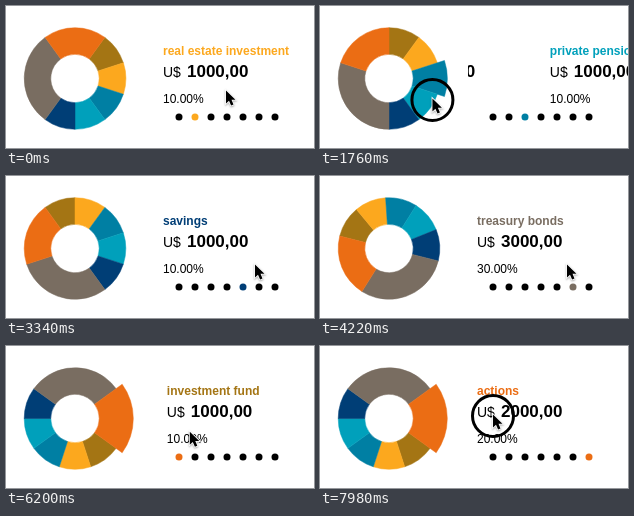
These frames come from a looping animation (308x142 px, 8000 ms). An HTML page with a canvas:

```html
<!DOCTYPE html>
<html lang="en">
<head>
<meta charset="utf-8">
<title>Portfolio donut</title>
<style>
  html, body { margin: 0; width: 100%; height: 100%; overflow: hidden; background: #fff; }
  canvas { display: block; }
</style>
</head>
<body>
<canvas id="stage" width="308" height="142"></canvas>
<script>
const ctx = document.getElementById('stage').getContext('2d');
const LOOP = 8000, TAU = Math.PI * 2;
const CX = 69, CY = 72.5, INNER = 24.2, OUTER = 50.8, POP = 7.5;
const PAGE_WIDTH = 160, DRAG_WIDTH = 90, POINTER_REACH = 110;
const DRAG_MS = 180, SETTLE_MS = 260, TURN_DELAY = 520, RING_LEAD = 60;

// One entry per page and slice, clockwise: title, share in tenths, colour.
const items = [
  ['investment fund', 1, [164, 117, 20]],
  ['real estate investment', 1, [252, 168, 30]],
  ['fixed income', 1, [0, 127, 163]],
  ['private pension', 1, [0, 160, 187]],
  ['savings', 1, [0, 62, 118]],
  ['treasury bonds', 3, [121, 109, 97]],
  ['actions', 2, [235, 109, 20]],
].map(([title, share, color]) => ({ title, share, color }));

let edge = -0.15 * TAU;
for (const item of items) {
  item.start = edge;
  edge += item.share / 10 * TAU;
  item.end = edge;
}

// Press time and place of each swipe, and how long the pointer lingers after it.
// Swipes step one page forward, except the one that goes back.
const BACK = 7;
const swipes = [
  [-710, 219, 83], [460, 219, 83, 340], [1600, 218, 91], [2780, 255, 87],
  [3640, 248, 87], [4790, 246, 87], [5860, 238, 88], [7020, 186, 84], [8000, 172, 67],
].map(([press, x, y, linger = 0], i) => ({
  press, x, y, linger,
  release: press + DRAG_MS,
  turn: press + TURN_DELAY,
  from: i,
  to: i === BACK ? i - 1 : i + 1,
}));

const clamp = v => Math.min(1, Math.max(0, v));
const ramp = (t, start, length) => clamp((t - start) / length);
const smooth = u => u * u * (3 - 2 * u);
const easeOut = u => 1 - (1 - u) ** 3;
const mix = (a, b, u) => a + (b - a) * u;
const rgb = c => `rgb(${c.map(Math.round).join()})`;
const itemAt = page => items[page % items.length];

function angleOf(page) {
  const { start, end } = itemAt(page);
  return (start + end) / 2 + TAU * Math.floor(page / items.length);
}

function drawDonut(t, { turn, from, to }) {
  const turned = smooth(ramp(t, turn + 40, 150));
  const rotation = -mix(angleOf(from), angleOf(to), turned);
  const popFrom = 1 - ramp(t, turn, 40);
  const popTo = ramp(t, turn + 190, 70);
  ctx.lineWidth = 0.5;
  for (const item of items) {
    const pop = item === itemAt(from) ? popFrom : item === itemAt(to) ? popTo : 0;
    const a = item.start + rotation, b = item.end + rotation;
    ctx.beginPath();
    ctx.arc(CX, CY, OUTER + POP * pop, a, b);
    ctx.arc(CX, CY, INNER, b, a, true);
    ctx.closePath();
    ctx.fillStyle = ctx.strokeStyle = rgb(item.color);
    ctx.fill();
    ctx.stroke();
  }
}

function text(str, x, y, font, color = '#000') {
  ctx.font = font + ' "Liberation Sans", Arial, sans-serif';
  ctx.fillStyle = color;
  ctx.fillText(str, x, y);
}

function drawPage({ title, share, color }, x) {
  text(title, x, 49, 'bold 12px', rgb(color));
  text('U$', x, 71, '14px');
  text(share + '000,00', x + 24, 71, 'bold 17px');
  text(share + '0.00%', x, 97, '12px');
}

function drawPages(t, { press, release, from, to }) {
  const dragged = DRAG_WIDTH * smooth(ramp(t, press, DRAG_MS));
  const settled = easeOut(ramp(t, release, SETTLE_MS));
  const shift = dragged + (PAGE_WIDTH - DRAG_WIDTH) * settled;
  const dir = to - from;
  ctx.save();
  ctx.beginPath();
  ctx.rect(148, 30, PAGE_WIDTH, 74);
  ctx.clip();
  drawPage(itemAt(from), 157 - dir * shift);
  drawPage(itemAt(to), 157 + dir * (PAGE_WIDTH - shift));
  ctx.restore();
}

// The marked dot moves first; its colour follows.
function drawDots(t, { release, from, to }) {
  const active = itemAt(t < release + 145 ? from : to);
  const fade = ramp(t, release + 165, 150);
  const color = itemAt(from).color.map((c, i) => mix(c, itemAt(to).color[i], fade));
  items.forEach((item, i) => {
    ctx.beginPath();
    ctx.arc(173 + 16 * i, 111, 3.5, 0, TAU);
    ctx.fillStyle = item === active ? rgb(color) : '#000';
    ctx.fill();
  });
}

// Drag along with the page, then glide to where the next swipe begins.
function pointerAt(t, swipe) {
  const { press, x, y, release, linger, from, to } = swipe;
  const next = swipes[swipes.indexOf(swipe) + 1] ?? swipe;
  const dragX = x - (to - from) * POINTER_REACH * smooth(ramp(t, press, DRAG_MS));
  const back = easeOut(ramp(t, release + linger, SETTLE_MS));
  return [mix(dragX, next.x, back), mix(y, next.y, back)];
}

const arrow = new Path2D('M0 0V13L3 10.3L5.1 15L7.5 14L5.5 9.3H9.5Z');

function drawPointer(t, swipe) {
  const [x, y] = pointerAt(t, swipe);
  if (swipes.some(s => t >= s.press - RING_LEAD && t < s.release)) {
    ctx.beginPath();
    ctx.arc(x + 1, y + 3, 20.5, 0, TAU);
    ctx.lineWidth = 3;
    ctx.strokeStyle = '#000';
    ctx.stroke();
  }
  ctx.save();
  ctx.translate(x + 1, y + 1.5);
  ctx.lineWidth = 1.6;
  ctx.strokeStyle = '#fff';
  ctx.shadowColor = 'rgba(0, 0, 0, .35)';
  ctx.shadowBlur = 2;
  ctx.shadowOffsetY = 1;
  ctx.stroke(arrow);
  ctx.shadowColor = 'transparent';
  ctx.fillStyle = '#000';
  ctx.fill(arrow);
  ctx.restore();
}

function draw(t) {
  const swipe = swipes.findLast(s => s.press <= t);
  ctx.fillStyle = '#fff';
  ctx.fillRect(0, 0, 308, 142);
  drawDonut(t, swipe);
  drawPages(t, swipe);
  drawDots(t, swipe);
  drawPointer(t, swipe);
}

const origin = performance.now();
function frame() {
  draw((performance.now() - origin) % LOOP);
  requestAnimationFrame(frame);
}
frame();
</script>
</body>
</html>
```
